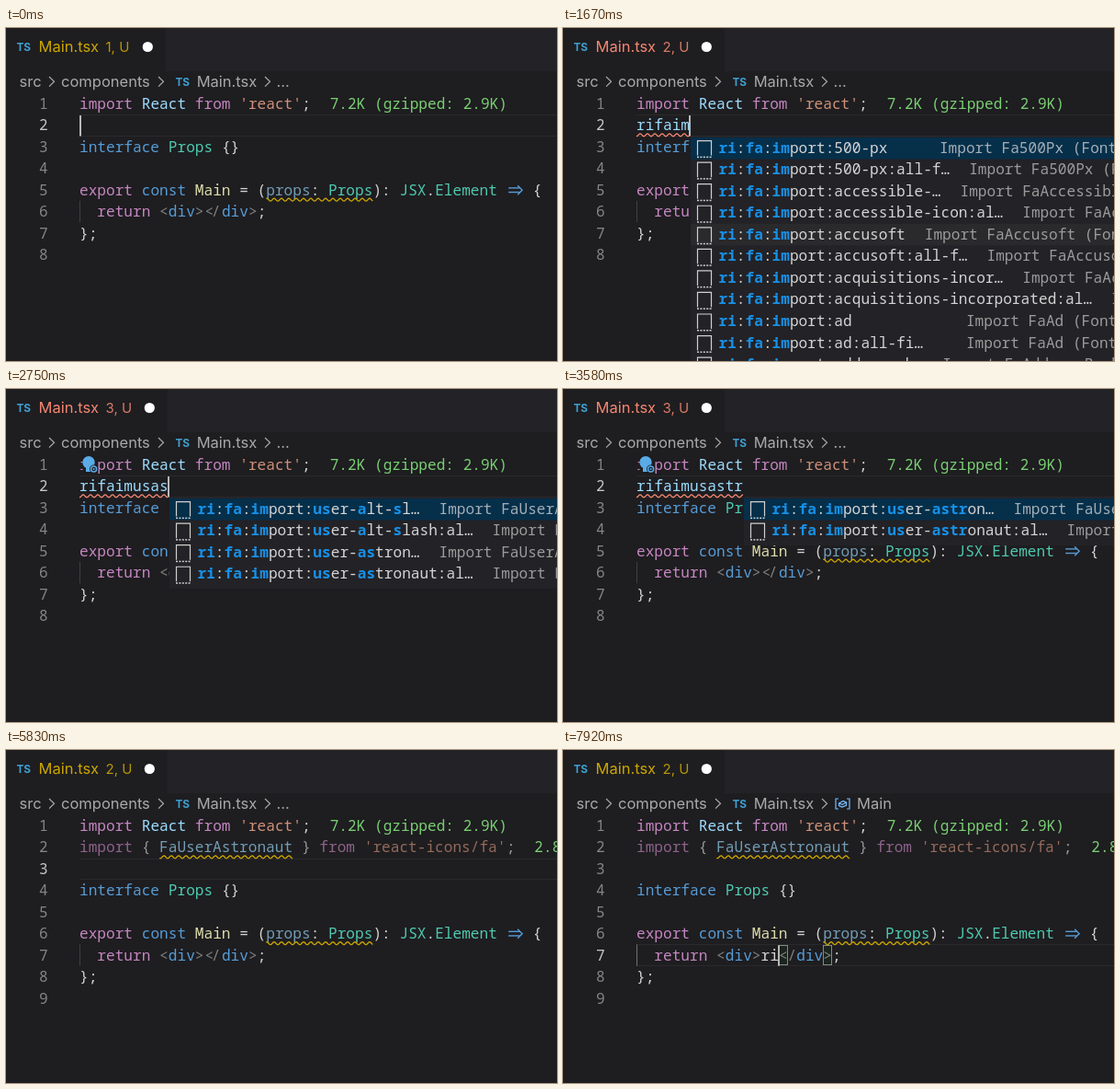
These frames come from a looping animation (600 by 362 pixels, 8 s). An HTML page with a canvas:

```html
<!DOCTYPE html>
<html lang="en">
<head>
<meta charset="utf-8">
<title>Editor snippet demo</title>
<style>
  html, body { margin: 0; width: 100%; height: 100%; overflow: hidden; background: #1e1d20; }
  canvas { display: block; width: 600px; height: 362px; }
</style>
</head>
<body>
<canvas id="stage"></canvas>
<script>
const canvas = document.getElementById('stage');
const ctx = canvas.getContext('2d');
const ratio = window.devicePixelRatio || 1;
canvas.width = 600 * ratio;
canvas.height = 362 * ratio;

const LOOP = 8000, LEFT = 80, CHAR = 9.68, ROW = 23.45, TOP = 70.6, ITEM = 23.55;
const FACE = '16.13px "Noto Sans Mono", "DejaVu Sans Mono", monospace';
const MONO = '500 ' + FACE, STRONG = '600 ' + FACE;
const UI = '16.5px Inter, "Open Sans", sans-serif';
const BG = '#1e1d20', PANEL = '#232226';
const C = {
  key: '#c586c0', word: '#569cd6', type: '#4ec9b0', name: '#9cdcfe', fn: '#dcdcaa',
  str: '#ce9178', text: '#d4d4d4', tag: '#808080', cost: '#79cf72',
  warn: '#cca700', error: '#f48771', symbol: '#75beff', bulb: '#5aabe6', match: '#1890e6'
};

// Moments of the session, in ms
const KEYS = [920, 1000, 1090, 1170, 1500, 1670, 1920, 2330, 2580, 2750, 2920, 3080];
const QUERY = 'rifaimusastr';
const CHECKED = 1170, BULB = 1750, ACCEPT = 4000, COST = 4170, LINTED = 4600;
const ENTER = 5250, CLICK = 6420, CRUMB = 6750, TAG_KEYS = [7670, 7830];
const EDITS = [0, ...KEYS, ACCEPT, ENTER, CLICK, ...TAG_KEYS];

const ICONS = ['500-px', 'accessible-icon', 'accusoft', 'acquisitions-incorporated', 'ad',
  'address-book', 'address-card', 'adjust', 'adn', 'adobe', 'adversal', 'uber', 'ubuntu',
  'uikit', 'umbraco', 'umbrella', 'umbrella-beach', 'usb', 'user', 'user-alt',
  'user-alt-slash', 'user-astronaut', 'user-check', 'user-circle', 'user-clock', 'user-cog'];

const colX = col => LEFT + col * CHAR;
const rowY = row => TOP + (row - 1) * ROW;
const countPast = (times, t) => times.filter(k => k <= t).length;

function rect(x, y, w, h, color) {
  ctx.fillStyle = color;
  ctx.fillRect(x, y, w, h);
}

function text(str, x, y, color, font = MONO) {
  ctx.font = font;
  ctx.fillStyle = color;
  ctx.fillText(str, x, y);
}

function path(points, color, width = 1.2) {
  ctx.beginPath();
  points.forEach(([x, y]) => ctx.lineTo(x, y));
  ctx.strokeStyle = color;
  ctx.lineWidth = width;
  ctx.stroke();
}

function disc(x, y, r, color) {
  ctx.beginPath();
  ctx.arc(x, y, r, 0, 7);
  ctx.fillStyle = color;
  ctx.fill();
}

function squiggle(row, from, to, color) {
  const points = [], y = rowY(row) + 22.3;
  for (let x = colX(from); x <= colX(to); x++) {
    points.push([x, y + 1.5 * Math.cos((x - LEFT) * Math.PI / 4)]);
  }
  path(points, color, 1.3);
}

function arrow(x, y) {
  path([[x + 2.5, y - 2.3], [x + 15, y - 2.3]], C.word, 1.4);
  path([[x + 2.5, y + 2.3], [x + 15, y + 2.3]], C.word, 1.4);
  path([[x + 12.5, y - 5], [x + 17.5, y], [x + 12.5, y + 5]], C.word, 1.4);
}

// Tokens are [text, color, alpha]; "=>" and "</" are drawn as ligatures.
function codeLine(row, tokens) {
  const base = rowY(row) + 17.4;
  let col = 0;
  for (const [str, color, alpha = 1] of tokens) {
    const x = colX(col);
    ctx.globalAlpha = alpha;
    if (str === '=>') arrow(x, base - 5.6);
    else if (str === '</') {
      text('<', x + 1, base, color);
      text('/', x + CHAR - 1.5, base, color);
    } else text(str, x, base, color);
    col += str.length;
  }
  ctx.globalAlpha = 1;
}

function header(t) {
  const failing = t >= CHECKED && t < LINTED;
  const problems = t < CHECKED ? 1 : t < BULB ? 2 : t < LINTED ? 3 : 2;
  const color = failing ? C.error : C.warn;
  const shift = problems > 1 ? 2 : 0;
  const typeFont = 'bold 11.8px Inter, sans-serif';
  rect(173.5 + shift, 0, 430, 47, PANEL);
  text('TS', 11.5, 24.5, '#3f9fd0', typeFont);
  text('Main.tsx', 35.5, 26, color, UI);
  ctx.globalAlpha = 0.88;
  text(problems + ', U', 108.5, 25.8, color, '15px Inter, sans-serif');
  ctx.globalAlpha = 1;
  disc(154.3 + shift, 20.5, 5.6, '#ffffff');

  const gray = '#a9a9a9';
  text('src', 14.5, 64, gray, UI);
  text('components', 60, 64, gray, UI);
  text('TS', 184.5, 62.5, '#3f9fd0', typeFont);
  text('Main.tsx', 207.7, 64, gray, UI);
  for (const x of [47, 166, 282]) path([[x, 53], [x + 5.5, 58.3], [x, 63.6]], gray);
  if (t < CRUMB) text('...', 294.5, 64, gray, UI);
  else {
    path([[300, 53], [297, 53], [297, 64], [300, 64]], C.symbol);
    path([[309, 53], [312, 53], [312, 64], [309, 64]], C.symbol);
    path([[300.5, 58], [305, 55.5], [308.5, 57], [308.5, 60], [304, 62], [300.5, 60.5], [300.5, 58], [304, 59.3], [308.5, 57]], C.symbol);
    text('Main', 320, 64, gray, UI);
  }
}

function code(t, typed, tagText) {
  const shift = t >= ENTER ? 1 : 0;
  const active = t >= CLICK ? 7 : 2 + shift;
  rect(LEFT, Math.round(rowY(active)), 520, 1, '#2a292c');
  rect(LEFT, Math.round(rowY(active + 1)) - 1, 520, 1, '#2a292c');
  for (let n = 1; n <= 8 + shift; n++) {
    text(String(n), 36, rowY(n) + 17.4, n === active ? '#c6c6c6' : '#858585');
  }

  codeLine(1, [['import ', C.key], ['React ', C.name], ['from ', C.key], ["'react'", C.str], [';', C.text]]);
  text('7.2K (gzipped: 2.9K)', colX(26) + 21, rowY(1) + 17.4, C.cost);

  if (t < ACCEPT) {
    codeLine(2, [[typed, C.name]]);
    if (t >= CHECKED) squiggle(2, 0, typed.length, C.error);
  } else {
    const fade = t >= LINTED ? 0.667 : 1;
    codeLine(2, [['import ', C.key, fade], ['{ ', C.text, fade], ['FaUserAstronaut', C.name, fade],
      [' } ', C.text, fade], ['from ', C.key, fade], ["'react-icons/fa'", C.str, fade], [';', C.text, fade]]);
    if (t >= COST) {
      text('2.8K (gzipped: 1.3K)', colX(49) + 21, rowY(2) + 17.4, C.cost);
      squiggle(2, 9, 24, C.warn);
    }
    if (t < LINTED) squiggle(2, 0, 9, C.error);
  }

  codeLine(3 + shift, [['interface ', C.word], ['Props ', C.type], ['{}', C.text]]);
  codeLine(5 + shift, [['export ', C.key], ['const ', C.word], ['Main ', C.fn], ['= (', C.text],
    ['props', C.name, 0.667], [': ', C.text], ['Props', C.type], ['): ', C.text], ['JSX', C.type],
    ['.', C.text], ['Element ', C.type], ['=>', C.word], [' {', C.text]]);
  squiggle(5 + shift, 21, 33, C.warn);

  const inTag = t >= CLICK;
  rect(LEFT, rowY(6 + shift), 1, ROW, inTag ? '#707070' : '#404040');
  if (inTag) {
    for (const col of [14, 19]) {
      const x = Math.round(colX(col + tagText.length)) + 0.5;
      rect(x, rowY(7) + 1, 9, 22, 'rgba(0,100,0,.1)');
      ctx.strokeStyle = '#888888';
      ctx.lineWidth = 1;
      ctx.strokeRect(x, Math.round(rowY(7)) + 1.5, 9, 21);
    }
  }
  const closing = inTag ? [['<', C.tag], ['/', C.tag]] : [['</', C.tag]];
  codeLine(6 + shift, [['  ', C.text], ['return ', C.key], ['<', C.tag], ['div', C.word], ['>', C.tag],
    [tagText, C.text], ...closing, ['div', C.word], ['>', C.tag], [';', C.text]]);
  codeLine(7 + shift, [['};', C.text]]);
}

function lightbulb() {
  rect(83.5, 72, 16, 21, BG);
  disc(90, 79.7, 6.7, C.bulb);
  rect(87, 84, 6, 6, C.bulb);
  disc(95.6, 87, 4.6, BG);
  disc(95.6, 87, 3.8, C.bulb);
  disc(95.6, 87, 2.3, BG);
  disc(95.6, 87, 1.1, C.bulb);
}

function matches(name, rest) {
  let at = 0;
  for (const c of name) if (c === rest[at]) at++;
  return at === rest.length && (!rest || name[0] === rest[0]);
}

function suggestions(query) {
  const importing = query.length > 4;
  const found = ICONS.filter(name => matches(name, query.slice(6)));
  return found.flatMap(name => {
    const component = 'Fa' + name.split('-').map(w => w[0].toUpperCase() + w.slice(1)).join('');
    const head = (importing ? 'Import ' : '') + component;
    const label = 'ri:fa:' + (importing ? 'import:' : '') + name;
    return importing ? [{ label, head }, { label: label + ':all-files', head }] : [{ label, head }];
  }).sort((a, b) => a.label < b.label ? -1 : 1).slice(0, 11);
}

function shorten(label) {
  const n = label.length;
  const cut = n < 25 ? 0 : n < 28 ? 2 : n < 36 ? 3 : 6;
  return cut ? label.slice(0, n - cut - 1) + '…' : label;
}

function snippetIcon(x, y) {
  path([[x, y + 16], [x, y], [x + 15, y], [x + 15, y + 16]], '#d0d0d0', 1.2);
  for (let i = 0; i < 5; i++) rect(x - 0.5 + i * 3.4, y + 17, 2, 1.5, '#d0d0d0');
}

function popup(query) {
  const items = suggestions(query);
  const left = Math.round(colX(query.length) + 0.7), top = 118;
  rect(left, top, 700, items.length * ITEM + 5, PANEL);
  items.forEach(({ label, head }, i) => {
    const y = top + 0.6 + i * ITEM, base = y + 17, labelX = left + 30.5;
    if (i === 0) rect(left, top + 1, 700, ITEM, '#062f4a');
    if (i === 4) rect(left, y, 700, ITEM, '#2a292c');
    snippetIcon(left + 7.5, y + 4);
    const shown = shorten(label);
    let hit = 0;
    [...shown].forEach((c, k) => {
      const matched = c === query[hit];
      if (matched) hit++;
      text(c, labelX + k * CHAR, base, matched ? C.match : C.text, matched ? STRONG : MONO);
    });
    const detailX = Math.max(labelX + shown.length * CHAR + 21, left + 406.4 - head.length * CHAR);
    text(head + ' (Font Awesome)', detailX, base, i === 0 ? '#a3aeb6' : '#9b9b9b');
  });
}

function caret(t, typed, tagText) {
  const since = t - EDITS.filter(e => e <= t).pop();
  if (since % 1000 >= 500) return;
  const [row, col] = t < ACCEPT ? [2, typed.length] : t < ENTER ? [2, 49]
    : t < CLICK ? [3, 0] : [7, 14 + tagText.length];
  rect(Math.round(colX(col)) - (col ? 1 : 0), rowY(row) + 1, 2, ROW - 1, '#b8b8b8');
}

function draw(t) {
  const typed = QUERY.slice(0, countPast(KEYS, t));
  const tagText = 'ri'.slice(0, countPast(TAG_KEYS, t));
  ctx.setTransform(ratio, 0, 0, ratio, 0, 0);
  rect(0, 0, 600, 362, BG);
  header(t);
  code(t, typed, tagText);
  if (t >= BULB && t < ACCEPT) lightbulb();
  if (typed.length > 1 && t < ACCEPT) popup(typed);
  caret(t, typed, tagText);
}

const start = performance.now();
function tick() {
  draw((performance.now() - start) % LOOP);
  requestAnimationFrame(tick);
}
tick();
</script>
</body>
</html>
```
